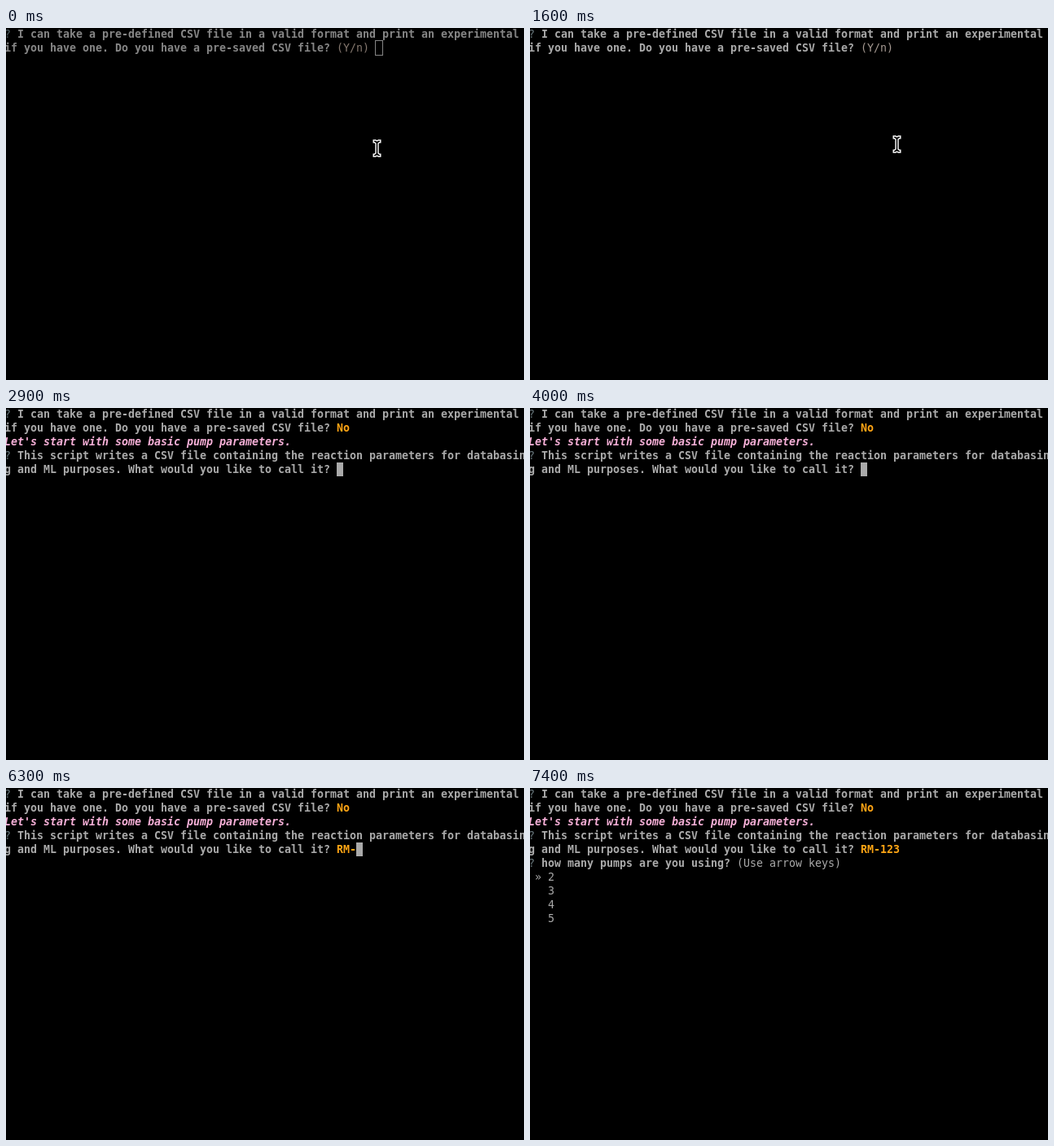
Recreate the animation shown at these times as an HTML page. Size 636 by 433 pixels, loop 8 s.

```html
<!DOCTYPE html>
<html lang="en">
<head>
<meta charset="utf-8">
<title>Terminal prompt</title>
<style>
html, body { margin: 0; width: 100%; height: 100%; overflow: hidden; background: #000; }
svg { display: block; }
text { font: 13.29px "DejaVu Sans Mono", monospace; white-space: pre; }
.b { font-weight: bold; }
.i { font-weight: bold; font-style: italic; }
</style>
</head>
<body>
<svg id="stage" width="636" height="433" viewBox="0 0 636 433">
  <rect width="636" height="433" fill="#000"/>
  <g id="rows"></g>
  <rect id="block" width="8" height="17" fill="#aaa"/>
  <rect id="outline" x="453.5" y="15.5" width="9" height="18" fill="none" stroke="#868686"/>
  <path id="beam" d="M-4.3-10H-1.5L0-9L1.5-10H4.3V-7.3H3L1.5-6V6L3 7.3H4.3V10H1.5L0 9L-1.5 10H-4.3V7.3H-3L-1.5 6V-6L-3-7.3H-4.3Z"
    fill="#000" stroke="#fff" stroke-width="1.4"/>
</svg>
<script>
const LOOP = 8000, CELL = 8, LINE = 17, LEFT = -2;
const ORANGE = "#ffa514", PINK = "#f7b0d8";
const $ = id => document.getElementById(id);
const rows = $("rows"), block = $("block"), outline = $("outline"), beam = $("beam");

// Words sit on the terminal's cell grid.
function write(parent, row, col, str, fill, cls = "") {
  for (const m of str.matchAll(/\S+/g)) {
    const t = document.createElementNS("http://www.w3.org/2000/svg", "text");
    t.setAttribute("x", LEFT + (col + m.index) * CELL);
    t.setAttribute("y", 12 + row * LINE);
    t.setAttribute("fill", fill);
    t.setAttribute("class", cls);
    t.textContent = m[0];
    parent.append(t);
  }
}

function group(draw) {
  const g = document.createElementNS("http://www.w3.org/2000/svg", "g");
  rows.append(g);
  draw((...args) => write(g, ...args));
  return g;
}

function question(put, ink, mark) {
  put(0, 0, "?", mark);
  put(0, 2, "I can take a pre-defined CSV file in a valid format and print an experimental", ink, "b");
  put(1, 0, "if you have one. Do you have a pre-saved CSV file?", ink, "b");
}

const dim = group(put => {
  question(put, "#868686", "#4b5b60");
  put(1, 51, "(Y/n)", "#85786f");
});
const lit = group(put => question(put, "#aaa", "#66757a"));
const hint = group(put => put(1, 51, "(Y/n)", "#a69a92"));
const naming = group(put => {
  put(1, 51, "No", ORANGE, "b");
  put(2, 0, "Let's start with some basic pump parameters.", PINK, "i");
  put(3, 0, "?", "#66757a");
  put(3, 2, "This script writes a CSV file containing the reaction parameters for databasin", "#aaa", "b");
  put(4, 0, "g and ML purposes. What would you like to call it?", "#aaa", "b");
});
const answer = group(() => {});
const menu = group(put => {
  put(5, 0, "?", "#66757a");
  put(5, 2, "how many pumps are you using?", "#aaa", "b");
  put(5, 32, "(Use arrow keys)", "#aaa");
  put(6, 1, "»", "#aaa");
  for (let n = 2; n <= 5; n++) put(4 + n, 3, String(n), "#aaa");
});

// Latest value whose start time has passed.
const at = (steps, t) => steps.filter(s => s[0] <= t).pop()[1];

const keys = [[0, ""], [5000, "R"], [5200, "RM"], [6300, "RM-"], [6500, "RM-1"], [6600, "RM-12"], [6800, "RM-123"]];
const blink = [[0, false], [1000, true], [1600, false], [2200, true], [3400, false], [4000, true],
  [5900, false], [6300, true], [7400, false]];
const beamX = [[0, 455.5], [1400, 454.5], [1500, 452.5], [1600, 450.5]];
const beamY = [[0, 148], [400, 146], [500, 144], [700, 143]];

const show = (el, on) => el.setAttribute("visibility", on ? "visible" : "hidden");
let typed = "";

function render(t) {
  const focus = t >= 1000, named = t >= 2900, entered = t >= 7300;
  show(dim, !focus);
  show(outline, !focus);
  show(lit, focus);
  show(hint, focus && !named);
  show(naming, named);
  show(menu, t >= 7400);

  const now = at(keys, t);
  if (now !== typed) {
    answer.replaceChildren();
    write(answer, 4, 51, now, ORANGE, "b");
    typed = now;
  }

  const col = entered ? 0 : named ? 51 + now.length : 57;
  const row = entered ? 5 : named ? 4 : 1;
  block.setAttribute("x", LEFT + col * CELL);
  block.setAttribute("y", row * LINE - 1);
  show(block, at(blink, t));

  show(beam, t < 2800);
  beam.setAttribute("transform", `translate(${at(beamX, t)} ${at(beamY, t)})`);
}

const start = performance.now();
function tick() {
  render((performance.now() - start) % LOOP);
  requestAnimationFrame(tick);
}
render(0);
requestAnimationFrame(tick);
</script>
</body>
</html>
```
